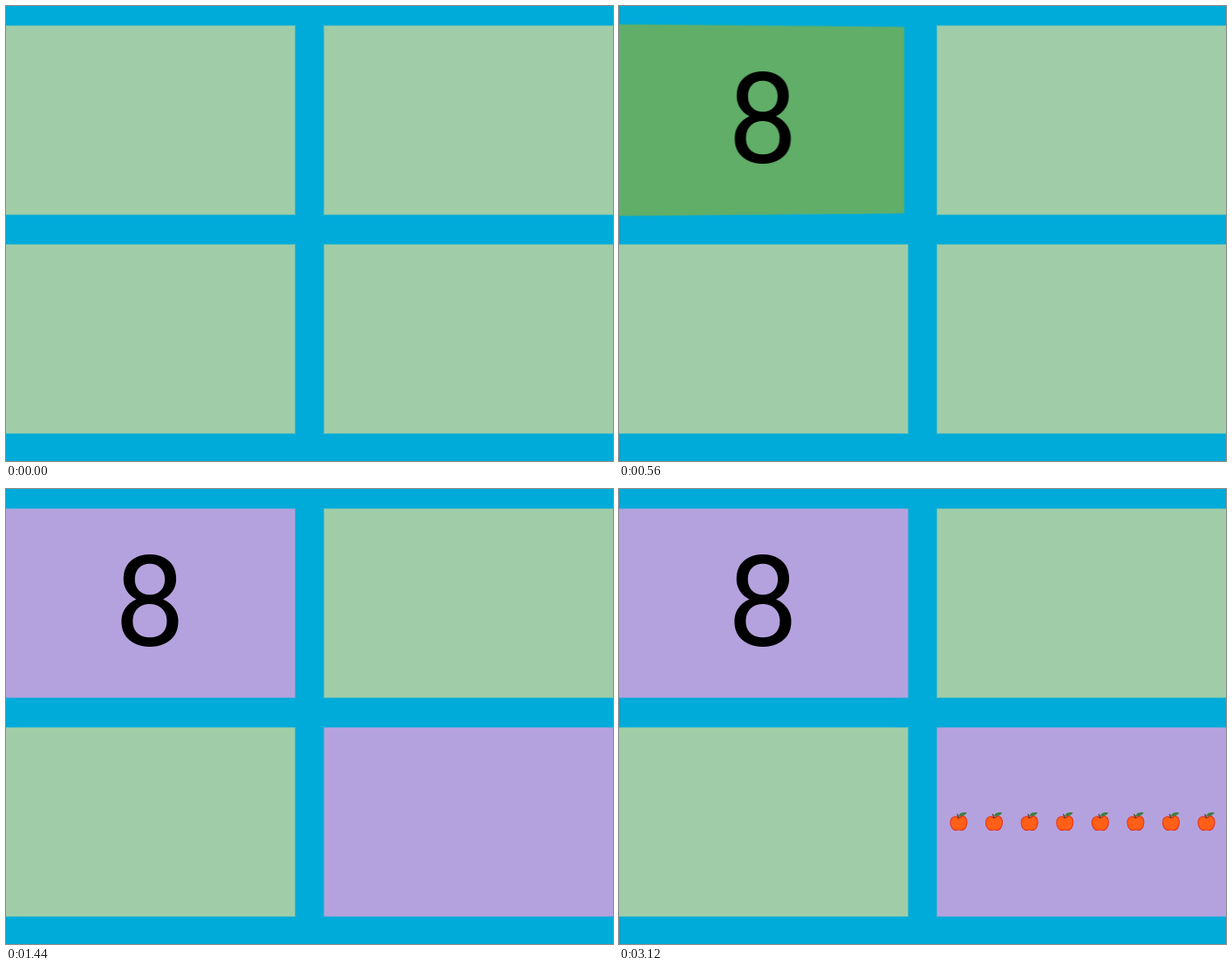
Write an HTML page that moves like this. It is 696x522 px and loops after 3200 ms.

```html
<!DOCTYPE html>
<html lang="en">
<head>
<meta charset="utf-8">
<title>Matching cards</title>
<style>
  html, body { margin: 0; width: 100%; height: 100%; overflow: hidden; }
  body { background: #00abd9; }

  .stage {
    position: relative;
    width: 696px;
    height: 522px;
    overflow: hidden;
    --pale: #a0cda7;
    --open: #60ae67;
    --match: #b4a2de;
  }

  .card {
    position: absolute;
    width: 335px;
    height: 218px;
    transform-style: preserve-3d;
  }
  .left { left: -3px; }
  .right { left: 364px; }
  .top { top: 22px; }
  .bottom { top: 273px; }

  /* The half-clear border gives a soft edge. */
  .face {
    position: absolute;
    inset: 0;
    color: var(--pale);
    background: currentColor padding-box;
    border: 1px solid color-mix(in srgb, currentColor 50%, transparent);
    backface-visibility: hidden;
  }
  .back { transform: rotateY(180deg); }
  .back svg { display: block; }

  .number { animation: flip-number 3.2s infinite; }
  .number .back { animation: match-open 3.2s step-end infinite; }
  .apples { animation: flip-apples 3.2s infinite; }
  .apples .face { animation: match-pale 3.2s step-end infinite; }

  @keyframes flip-number {
    0% {
      transform: perspective(1910px) rotateY(0deg);
      animation-timing-function: cubic-bezier(.4, 0, .2, 1);
    }
    24.2%, 100% { transform: perspective(1910px) rotateY(-180deg); }
  }

  /* The second flip shows up late, already past its middle. */
  @keyframes flip-apples {
    0%, 47.499% { transform: perspective(1910px) rotateY(0deg); }
    47.5% {
      transform: perspective(1910px) rotateY(-147deg);
      animation-timing-function: cubic-bezier(.22, .593, .53, 1);
    }
    59.1%, 100% { transform: perspective(1910px) rotateY(-180deg); }
  }

  @keyframes match-open {
    0% { color: var(--open); }
    45%, 100% { color: var(--match); }
  }
  @keyframes match-pale {
    0% { color: var(--pale); }
    45%, 100% { color: var(--match); }
  }

  text { font: 144px Roboto, sans-serif; text-anchor: middle; }
</style>
</head>
<body>
<div class="stage">
  <div class="card left top number">
    <div class="face"></div>
    <div class="face back">
      <svg width="333" height="216"><text x="167" y="156.5">8</text></svg>
    </div>
  </div>
  <div class="card right top"><div class="face"></div></div>
  <div class="card left bottom"><div class="face"></div></div>
  <div class="card right bottom apples">
    <div class="face"></div>
    <div class="face back">
      <svg width="333" height="216">
        <defs>
          <g id="apple">
            <path fill="#e5331b" d="M0-6.3C-3-8.4-10-7.5-10 .4C-10 5.5-6.5 9.5-3.2 9.5C-1.6 9.5-1 9 .2 9C1.5 9 2 9.5 3.5 9.5C7 9.5 10 5 10-.6C10-8 3.5-8.6 0-6.3Z"/>
            <path fill="#ff5f16" d="M0-5.4C-3-7.5-9-6.4-9 .2C-9 4.7-6 8.4-3.2 8.4C-1.5 8.4-1 7.9 .2 7.9C1.5 7.9 2 8.4 3.3 8.4C6.2 8.4 9 4.4 9-.6C9-7 3.2-7.6 0-5.4Z"/>
            <path fill="none" stroke="#b5311c" d="M-2.8-6Q0-4.2 3.2-6"/>
            <path fill="none" stroke="#5b4526" stroke-width="1.4" d="M0-4.8Q-.3-8-2-9.6"/>
            <path fill="#3f7d3c" d="M0-7.6C1.5-11.5 5.5-12 9.3-11.2C7.5-7.8 3.5-6.6 0-7.6Z"/>
          </g>
        </defs>
        <g transform="translate(24.5 108.5)">
          <use href="#apple"/>
          <use href="#apple" x="40.57"/>
          <use href="#apple" x="81.14"/>
          <use href="#apple" x="121.71"/>
          <use href="#apple" x="162.28"/>
          <use href="#apple" x="202.85"/>
          <use href="#apple" x="243.42"/>
          <use href="#apple" x="284"/>
        </g>
      </svg>
    </div>
  </div>
</div>
</body>
</html>
```
